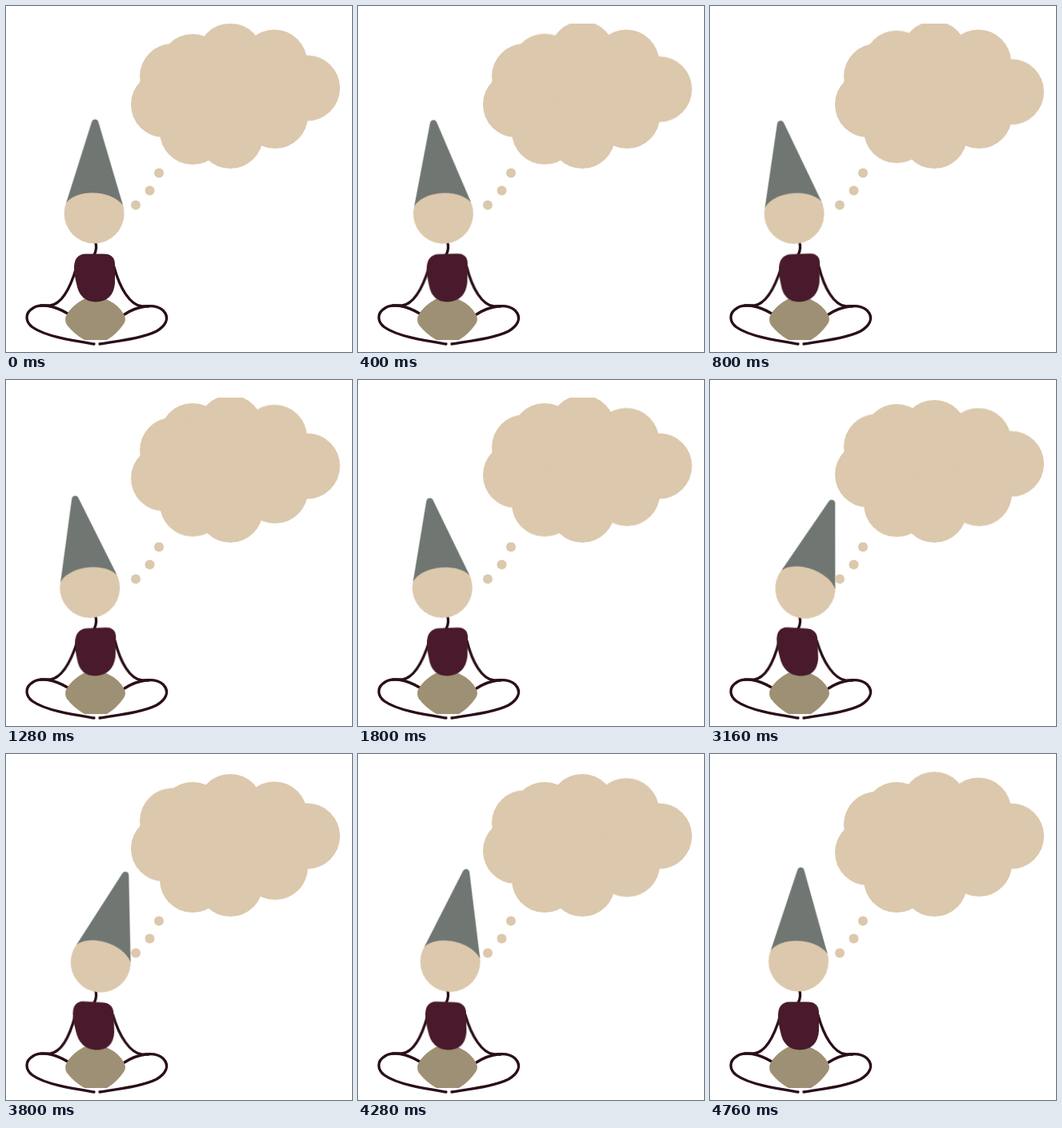
Recreate the animation shown at these times as an HTML page. Size 432 by 432 pixels, loop 4.8 s.

```html
<!DOCTYPE html>
<html lang="en">
<head>
<meta charset="utf-8">
<title>Meditating figure</title>
<style>
  html, body { margin: 0; width: 100%; height: 100%; overflow: hidden; background: #fff; }
  svg { display: block; width: 100vw; height: 100vh; }

  .line { fill: none; stroke: #2a0e1a; stroke-width: 3.3; stroke-linecap: round; }
  .skin { fill: #dcc8ac; }

  .head  { transform-origin: 110px 290px; animation: sway 4.8s infinite; }
  .hat   { transform-origin: 110px 247px; animation: squash 4.8s infinite; }
  .upper { transform-origin: 112px 374px; animation: lean 4.8s infinite; }
  .torso { transform-origin: 111px 340px; animation: tilt 4.8s infinite; }

  /* Left extreme at 1350 ms, right extreme at 3500 ms */
  @keyframes sway {
    0%, 100% { transform: rotate(.2deg); animation-timing-function: cubic-bezier(.18, .64, .42, 1); }
    28.1% { transform: rotate(-9.8deg); animation-timing-function: cubic-bezier(.7, 0, .25, 1); }
    72.9% { transform: rotate(17.3deg); animation-timing-function: cubic-bezier(.35, .1, .72, .54); }
  }
  @keyframes lean {
    0%, 100% { transform: skewX(0deg); animation-timing-function: cubic-bezier(.18, .64, .42, 1); }
    28.1% { transform: skewX(-1.4deg); animation-timing-function: cubic-bezier(.7, 0, .25, 1); }
    72.9% { transform: skewX(2deg); animation-timing-function: cubic-bezier(.35, .1, .72, .54); }
  }
  @keyframes tilt {
    0%, 100% { transform: skewY(0deg); animation-timing-function: cubic-bezier(.18, .64, .42, 1); }
    28.1% { transform: skewY(-2.5deg); animation-timing-function: cubic-bezier(.7, 0, .25, 1); }
    72.9% { transform: skewY(3.5deg); animation-timing-function: cubic-bezier(.35, .1, .72, .54); }
  }
  @keyframes squash {
    0%, 17%, 74%, 100% { transform: scaleY(1); animation-timing-function: ease-in-out; }
    51% { transform: scaleY(.938); animation-timing-function: ease-in-out; }
  }

  /* Each lobe shifts by --dy, rests there, and returns */
  .lobe { animation: bob 4.8s cubic-bezier(.65, 0, .35, 1) var(--at) infinite; }
  @keyframes bob {
    0%, 79%, 100% { transform: translateY(0); }
    24%, 55% { transform: translateY(var(--dy)); }
  }
  .first  { --at: -.6s; }
  .second { --at: -.076s; }
  .third  { --at: -4.68s; }
  .fourth { --at: -3.976s; }
  .last   { --at: -3.776s; }
</style>
</head>
<body>
<svg viewBox="0 0 432 432">
  <clipPath id="top"><rect y="22.3" width="432" height="410"/></clipPath>

  <path class="line" d="M111.300 294Q114.500 302 110 311"/>
  <path class="line" d="M77 384C60 374 44 371 34 377C22 384 25 395 33 401C50 413 85 418 110 422"/>
  <path class="line" d="M148 385C165 374 186 371 196 380C206 390 198 400 188 406C170 415 140 418 117 422"/>
  <path fill="#9e9074" d="M97 366Q112 360 127 367Q141 373.500 147 385Q151 391 147 397Q138 410 126 417H98Q84 409 76 398Q72 391 76 385Q83 373.500 97 366Z"/>

  <g class="upper">
    <path class="line" d="M88 326C81 350 70 372 55 374H43"/>
    <path class="line" d="M135 326C142 352 155 374 170 375H178"/>
    <path class="torso" fill="#481a2b" d="M99 309.500H122Q136 309.500 136 323V346Q134 369 112 369.500Q92 369 88 347Q85 335 85 325Q86 310 99 309.500Z"/>
  </g>

  <g class="head">
    <circle class="skin" cx="110" cy="259" r="37.500"/>
    <path class="hat" fill="#707672" d="M75 246L106.500 145Q107.500 141.500 110.800 141.500T115 145L146 249C132 229 88 228 75 246Z"/>
  </g>

  <g class="skin">
    <circle cx="191" cy="208.500" r="6"/>
    <circle cx="179.500" cy="230.500" r="6"/>
    <circle cx="162" cy="248.500" r="6"/>
  </g>

  <g class="skin" clip-path="url(#top)">
    <path d="M208 88L233 72L280 63L335 72L376 105L335 139L280 162L233 156L197 121Z"/>
    <circle class="lobe first" style="--dy:-6px" cx="280" cy="66" r="41"/>
    <circle class="lobe second" style="--dy:5px" cx="376" cy="102.500" r="41"/>
    <circle class="lobe third" style="--dy:-6px" cx="233" cy="76" r="41"/>
    <circle class="lobe third" style="--dy:-2.500px" cx="233" cy="157" r="41"/>
    <circle class="lobe fourth" style="--dy:5.500px" cx="335" cy="70.500" r="41"/>
    <circle class="lobe fourth" style="--dy:4.500px" cx="336" cy="137" r="41"/>
    <circle class="lobe last" style="--dy:-4.500px" cx="208" cy="88" r="41"/>
    <circle class="lobe last" style="--dy:-5px" cx="197" cy="123" r="41"/>
    <circle cx="280" cy="162" r="41"/>
  </g>
</svg>
</body>
</html>
```
